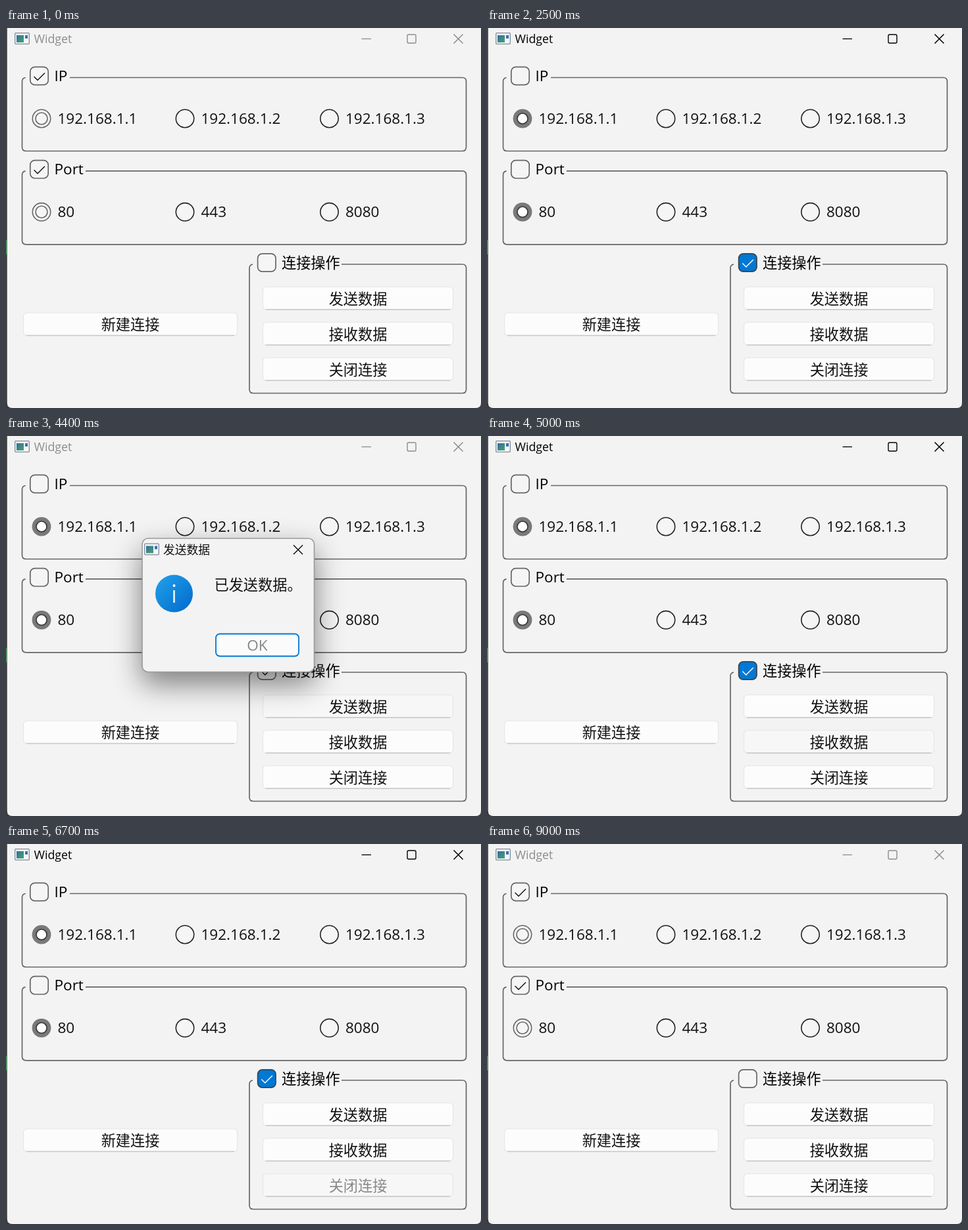
An HTML page that plays this animation: 722 by 579 pixels, repeating every 9100 ms.

```html
<!DOCTYPE html>
<html lang="zh">
<head>
<meta charset="utf-8">
<title>Widget</title>
<style>
html, body { margin: 0; width: 100%; height: 100%; overflow: hidden; background: #3c3c3c; }
svg { display: block; width: 722px; height: 579px; }
text { font: 22.5px "Open Sans", "Noto Sans CJK SC", "Noto Sans CJK", sans-serif; white-space: pre; }
.cjk { font-size: 22.2px; }
.title { font-size: 17.8px; }
.shadow { filter: drop-shadow(0 18px 22px rgba(0, 0, 0, .48)); }
</style>
</head>
<body>
<svg id="stage" viewBox="0 0 722 579"></svg>
<script>
const LOOP = 9100, STEP = 100;
const BLUE = '#0078d4', GREY = '#666', PALE = '#f3f3f3';
const stage = document.getElementById('stage');

// press: button held, show: dialog appears, ok: OK pressed, close..gone: fade-out
const dialogs = [
  { title: '新建连接', lines: ['新建连接成功：', 'IP：192.168.1.1', 'Port：80'],
    x: 193.5, y: 137, w: 286.5, h: 240, press: 1400, show: 1500, ok: 2000, close: 2200, gone: 2500 },
  { title: '发送数据', lines: ['已发送数据。'], press: 3900, show: 4000, ok: 4400, close: 4500, gone: 4600 },
  { title: '接收数据', lines: ['已接收数据。'], press: 5200, show: 5400, ok: 6000, close: 6100, gone: 6300 },
  { title: '关闭连接', lines: ['已关闭连接。'], press: 6700, show: 6900, ok: 7400, close: 7500, gone: 7700 }
].map(d => ({ x: 207, y: 156, w: 261.5, h: 203.5, ...d }));

const buttons = [
  { label: '新建连接', x: 26, y: 434, w: 326, hover: [1200, 2000] },
  { label: '发送数据', x: 390, y: 394.5, w: 290, hover: [3700, 4800] },
  { label: '接收数据', x: 390, y: 448.5, w: 290, hover: [5000, 6000] },
  { label: '关闭连接', x: 390, y: 502.5, w: 290, hover: [6700, 7500] }
];

const within = (t, a, b) => t >= a && t < b;

const text = (s, x, y, fill = '#111', cls = '', anchor = 'start') =>
  `<text x="${x}" y="${y}" fill="${fill}" class="${cls}" text-anchor="${anchor}">${s}</text>`;

const line = (d, stroke, width = 1.4) =>
  `<path d="${d}" fill="none" stroke="${stroke}" stroke-width="${width}"/>`;

const box = (x, y, w, h, r, fill, stroke, width = 1.6) =>
  `<rect x="${x}" y="${y}" width="${w}" height="${h}" rx="${r}" fill="${fill}" stroke="${stroke}" stroke-width="${width}"/>`;

const disc = (x, y, r, fill, stroke = 'none', width = 1.6) =>
  `<circle cx="${x}" cy="${y}" r="${r}" fill="${fill}" stroke="${stroke}" stroke-width="${width}"/>`;

const cross = (x, y, stroke) => line(`M${x - 7} ${y - 7}l14 14m0-14l-14 14`, stroke, 1.5);

const appIcon = (x, y) =>
  box(x + .7, y + .7, 21.6, 16.6, 1, '#f4f7fa', '#7f8c99', 1.3) +
  `<rect x="${x + 3}" y="${y + 4}" width="11" height="11" fill="url(#teal)"/>` +
  `<rect x="${x + 16}" y="${y + 4}" width="4" height="5" fill="#3d6fb5"/>`;

// Frame whose top edge is left open for the caption
function group(x, y, right, bottom, gapEnd) {
  const r = 6;
  return line(`M${gapEnd} ${y}H${right - r}q${r} 0 ${r} ${r}V${bottom - r}q0 ${r} ${-r} ${r}` +
    `H${x + r}q${-r} 0 ${-r} ${-r}V${y + r}q0 ${1 - r} 5 ${-r}`, GREY, 1.7);
}

function checkbox(x, y, checked, active) {
  const on = checked && active;
  return box(x - 13.7, y - 13.7, 27.4, 27.4, 7, on ? BLUE : '#f5f5f5', on ? '#3a4550' : GREY, 1.7) +
    (checked ? line(`M${x - 8} ${y + 1}l5.5 5.5 11-11`, on ? '#fff' : '#111') : '');
}

function radio(x, y, checked, active, enabled) {
  if (!checked) return disc(x, y, 13.7, '#f5f5f5', '#222');
  if (!enabled) return disc(x, y, 14.4, '#797979') + disc(x, y, 8, '#fff', '#333');
  return active
    ? disc(x, y, 13.7, BLUE, '#3a4550') + disc(x, y, 8, '#fff', '#333')
    : disc(x, y, 13.7, '#f5f5f5', GREY) + disc(x, y, 9, '#f5f5f5', GREY);
}

function optionGroup(caption, y, labels, gapEnd, active, enabled) {
  return group(24.5, y, 699.5, y + 112, gapEnd) +
    checkbox(50.5, y - 2.5, enabled, active) +
    text(caption, 73.5, y + 5.5, '#000') +
    [54, 272, 491.5].map((x, i) =>
      radio(x, y + 62.5, i === 0, active, enabled) +
      text(labels[i], x + 24.5, y + 70.5)).join('');
}

function button(b, i, t) {
  const pressed = within(t, dialogs[i].press, dialogs[i].show);
  const fill = within(t, ...b.hover) ? '#f7f7f7' : '#fcfcfc';
  return box(b.x + .5, b.y, b.w - 1, 34.5, 5, fill, '#e6e6e6', 1.2) +
    line(`M${b.x + 5} ${b.y + 34.5}h${b.w - 10}`, '#c6c6c6', 1.3) +
    text(b.label, b.x + b.w / 2, b.y + 26, pressed ? '#888' : '#111', 'cjk', 'middle');
}

function mainWindow(t, active, connected) {
  const ink = active ? '#000' : '#8c8c8c';
  return `<path d="M1.7 0H722V571q0 8-8 8H9.7q-8 0-8-8z" fill="${PALE}"/>` +
    '<rect y="323" width="1.7" height="22" fill="#4f9a63"/>' +
    appIcon(13, 7) + text('Widget', 42.5, 23, ink, 'title') +
    line('M540.5 16.5h14.5', ink, 1.3) +
    box(610, 10, 13, 13, 2, 'none', ink, 1.4) + cross(687.5, 16.5, ink) +
    optionGroup('IP', 75.5, ['192.168.1.1', '192.168.1.2', '192.168.1.3'], 97, active, !connected) +
    optionGroup('Port', 217.8, ['80', '443', '8080'], 121, active, !connected) +
    group(370, 360, 699.5, 556.5, 510) +
    checkbox(396.3, 357.5, connected, active) + text('连接操作', 419, 366, '#000', 'cjk') +
    buttons.map((b, i) => button(b, i, t)).join('');
}

function dialog(d, t) {
  const fade = t < d.close
    ? Math.min(1, (t - d.show + STEP) / (2 * STEP))
    : (d.gone - t) / (d.gone - d.close + STEP);
  const { x, y, w, h } = d;
  const cx = x + w / 2, cy = y + h / 2, scale = .92 + .08 * fade;
  const ix = x + 48.5, iy = y + 84;
  const ox = x + w - 149.5, oy = y + h - 58;
  const pressed = t >= d.ok;
  return `<g opacity="${fade}" transform="translate(${cx} ${cy}) scale(${scale}) translate(${-cx} ${-cy})">` +
    `<g class="shadow">${box(x, y, w, h, 9, PALE, '#9a9a9a', 1.6)}</g>` +
    appIcon(x + 3, y + 7.5) + text(d.title, x + 32, y + 23.8, '#111', 'title') +
    cross(x + w - 24.5, y + 17.3, '#111') +
    disc(ix, iy, 28.5, 'url(#info)') + disc(ix, iy - 12, 2, '#fff') +
    line(`M${ix} ${iy - 5}v19`, '#fff', 2.4) +
    d.lines.map((s, i) => text(s, x + 109.5, y + 78.5 + 28.3 * i, '#111', 'cjk')).join('') +
    box(ox, oy, 126, 34, 6, '#fbfbfb', BLUE, 1.8) +
    (pressed ? '' : line(`M${ox + 5} ${oy + 34}h116`, '#15507f', 1.8)) +
    text('OK', ox + 63, oy + 25.2, pressed ? '#858585' : '#111', '', 'middle') + '</g>';
}

const defs = '<defs>' +
  '<linearGradient id="info" x2="1" y2="1"><stop stop-color="#22a2ea"/><stop offset="1" stop-color="#0069cc"/></linearGradient>' +
  '<linearGradient id="teal" x2="1" y2="1"><stop stop-color="#2f6fa0"/><stop offset="1" stop-color="#4fa06c"/></linearGradient>' +
  '</defs>';

function draw(t) {
  const open = dialogs.find(d => within(t, d.show, d.gone));
  const modal = open && t < open.close;
  const active = within(t, 100, 9000) && !modal;
  const connected = within(t, dialogs[0].close, dialogs[3].close);
  stage.innerHTML = defs + mainWindow(t, active, connected) + (open ? dialog(open, t) : '');
}

const start = performance.now();
let last = -1;
function tick() {
  const t = Math.floor((performance.now() - start) % LOOP / STEP) * STEP;
  if (t !== last) draw(last = t);
  requestAnimationFrame(tick);
}
tick();
</script>
</body>
</html>
```
